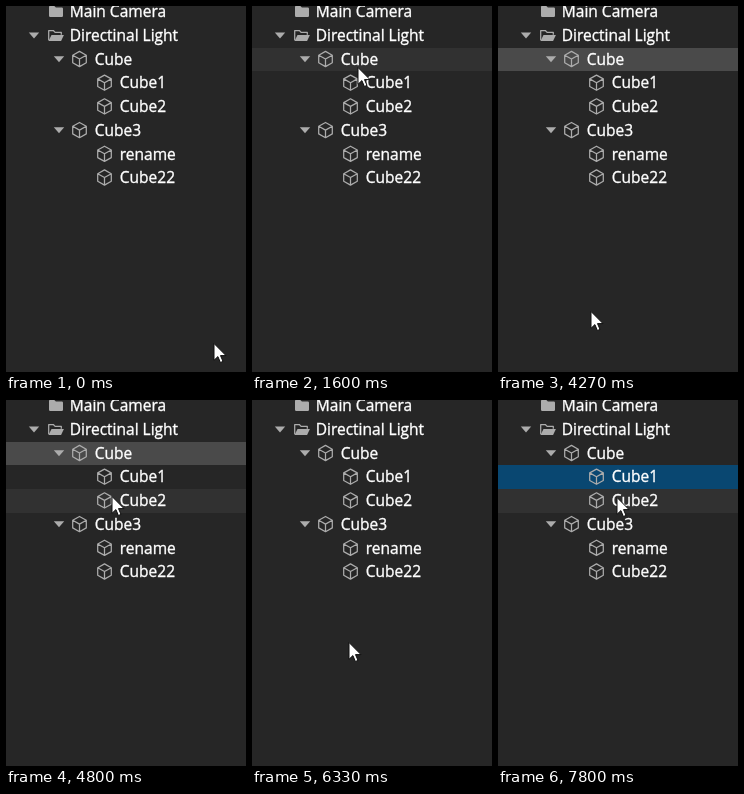
These frames come from a looping animation (240 by 366 pixels, 8 s). An HTML page:

```html
<!DOCTYPE html>
<html lang="en">
<head>
<meta charset="utf-8">
<title>Scene tree</title>
<style>
html, body { margin: 0; width: 100%; height: 100%; overflow: hidden; background: #262626; }
svg { display: block; width: 240px; height: 366px; }
text { font: 15.5px "Open Sans", "Noto Sans", sans-serif; fill: #fff; stroke: #fff; stroke-width: .35; }
.line { fill: none; stroke: #acacac; stroke-width: 1.25; stroke-linejoin: round; }
.solid { fill: #acacac; }
</style>
</head>
<body>
<svg viewBox="0 0 240 366">
  <defs>
    <path id="cube" class="line" d="M0-7.6 6.8-3.8V3.8L0 7.6-6.8 3.8V-3.8ZM-6.8-3.8 0 0 6.8-3.8M0 0V7.6"/>
    <path id="folder" class="solid" d="M-5.5-4.6q0-1.2 1.2-1.2h3.9l1.8 1.8h5.9q1.2 0 1.2 1.2v7q0 1.2-1.2 1.2H-4.3Q-5.5 5.4-5.5 4.2Z"/>
    <g id="open">
      <path class="line" d="M-5.8 5V-4.8h4.6l1.8 1.9h6.2v2.4"/>
      <path class="solid" d="M-6 5.8l3-6.2H9.4L6.6 5.8Z"/>
    </g>
    <path id="arrow" class="solid" d="M-5.2-2.8H5.2L0 3.2Z"/>
  </defs>
  <rect id="hover" width="240" fill="#313131"/>
  <rect id="chosen" width="240"/>
  <g id="tree"></g>
  <path id="pointer" d="M0-.5V16.3L3.9 12.6 6.4 18.5 9 17.4 6.5 11.6H12Z" fill="#fff" stroke="#101010"/>
</svg>
<script>
const FPS = 15, TICKS = 120;
const BLUE = '#094771', GREY = '#4a4a4a';
const $ = id => document.getElementById(id);
const rowY = i => 18 + 23.7 * i;
const rowTop = i => Math.round(rowY(i));

// label, icon, depth, expanded; the first row is cut off by the top edge
const rows = [
  ['Main Camera', 'folder', 0],
  ['Directinal Light', 'open', 0, true],
  ['Cube', 'cube', 1, true],
  ['Cube1', 'cube', 2],
  ['Cube2', 'cube', 2],
  ['Cube3', 'cube', 1, true],
  ['rename', 'cube', 2],
  ['Cube22', 'cube', 2]
];
$('tree').innerHTML = rows.map(([label, icon, depth, expanded], n) => {
  const x = 25 * depth, mid = rowY(n - 1) + 11.3;
  const use = (id, dx) => `<use href="#${id}" x="${x + dx}" y="${mid}"/>`;
  return (expanded ? use('arrow', 28) : '') + use(icon, 48.5) +
    `<text x="${x + 63.8}" y="${rowTop(n - 1) + 17}">${label}</text>`;
}).join('');

// pointer moves: start tick, end tick, x, y, sideways bow
const home = [208, 338];
const moves = [
  [0, 4, 163, 172, -45],
  [6, 8, 138, 142],
  [10, 12, 124, 142],
  [14, 24, 106, 62, -15],
  [38, 40, 88, 242],
  [63, 64, 93, 306],
  [64, 73, 106, 97],
  [77, 86, 93, 255],
  [94, 95, 97, 243],
  [95, 104, 109, 68, 9],
  [108, 117, 119, 98]
];
const isAway = tick => tick > 40 && tick < 64;

// selection changes: tick, row, colour
const picks = [
  [0], [33, 1, BLUE], [53, 1, GREY], [74, 3, GREY],
  [78, 3, BLUE], [88], [106, 2, GREY], [107, 2, BLUE]
];

const easeOut = k => 1 - (1 - k) ** 3;

function locate(tick) {
  let [x, y] = home;
  for (const [from, to, toX, toY, bow = 0] of moves) {
    if (tick <= from) break;
    const k = easeOut(Math.min(1, (tick - from) / (to - from)));
    x += (toX - x) * k + bow * Math.sin(Math.PI * k);
    y += (toY - y) * k;
  }
  return [Math.round(x), Math.round(y)];
}

function show(el, on) {
  el.setAttribute('visibility', on ? 'visible' : 'hidden');
}

function fillRow(rect, row) {
  const on = row >= 0 && row < rows.length - 1;
  show(rect, on);
  if (!on) return;
  rect.setAttribute('y', rowTop(row));
  rect.setAttribute('height', rowTop(row + 1) - rowTop(row));
}

function draw(ms) {
  const tick = Math.floor((ms + 4) * FPS / 1000) % TICKS;
  const [x, y] = locate(tick), away = isAway(tick);
  const [, row, colour] = picks.findLast(p => p[0] <= tick);
  show($('pointer'), !away);
  $('pointer').setAttribute('transform', `translate(${x} ${y})`);
  fillRow($('hover'), away ? -1 : rows.findIndex((_, n) => y < rowTop(n)) - 1);
  fillRow($('chosen'), row);
  if (colour) $('chosen').setAttribute('fill', colour);
}

let start;
function loop(now) {
  start ??= now;
  draw(now - start);
  requestAnimationFrame(loop);
}
draw(0);
requestAnimationFrame(loop);
</script>
</body>
</html>
```
